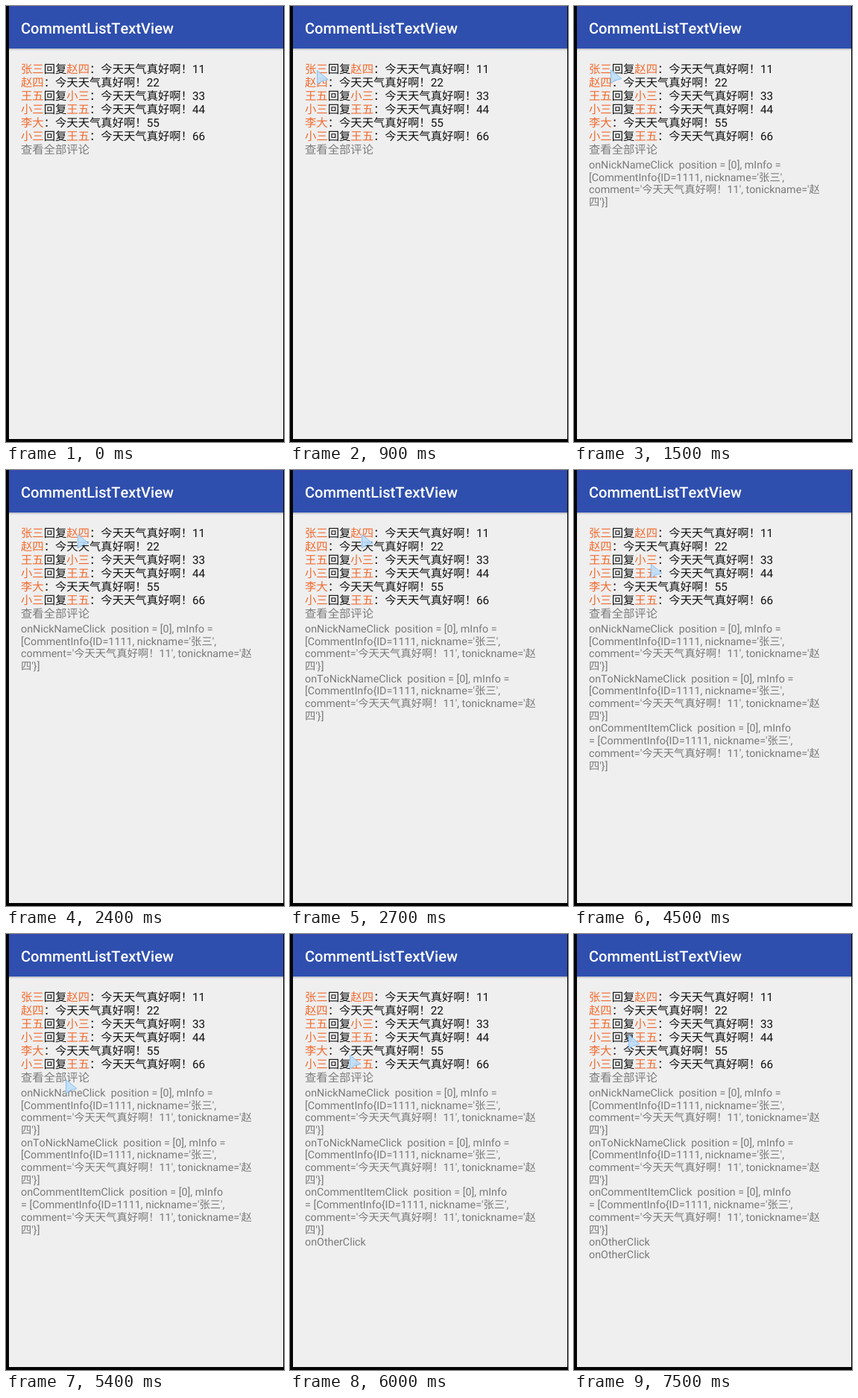
Animation, 373 px wide and 585 px high, one loop 8000 ms. Source, as an HTML page:

```html
<!DOCTYPE html>
<html lang="zh-CN">
<head>
<meta charset="utf-8">
<title>CommentListTextView</title>
<style>
  html, body { margin: 0; height: 100%; overflow: hidden; background: #040404; }
  svg { display: block; width: 373px; height: 585px; }
  text {
    font-family: Roboto, "Noto Sans CJK SC", "Noto Sans CJK", sans-serif;
    font-kerning: none;
    white-space: pre;
    text-rendering: geometricPrecision;
  }
  .title { font-size: 20.1px; font-weight: 500; fill: #fff; }
  .comment { font-size: 15.33px; fill: #111; }
  .name { fill: #f26a2e; }
  .more { fill: #7c7c7c; }
  .log { font-size: 14.3px; fill: #7a7a7a; }
</style>
</head>
<body>
<svg viewBox="0 0 373 585">
  <defs>
    <linearGradient id="shade" x2="0" y2="1">
      <stop stop-color="#b4b8c2"/>
      <stop offset="1" stop-color="#efefef"/>
    </linearGradient>
  </defs>
  <rect x="4" width="368" height="581" fill="#efefef"/>
  <rect x="4" width="368" height="57" fill="#2f4fae"/>
  <rect x="4" y="57" width="368" height="3" fill="url(#shade)"/>
  <rect x="8.5" y="1.5" width="361" height="47" fill="none" stroke="#4a3cb8" stroke-opacity=".5"/>
  <text class="title" x="20" y="37">CommentListTextView</text>
  <g id="comments"></g>
  <g id="logs"></g>
  <path id="cursor" d="M2.5 1.5V20L8 16L17 13.5Z" fill="#bcdefa" fill-opacity=".9" stroke="#8cc0f2" stroke-linejoin="round"/>
</svg>
<script>
const LOOP = 8000, BEAT = 300;
const $ = id => document.getElementById(id);

function add(parent, tag, attributes = {}) {
  const el = document.createElementNS("http://www.w3.org/2000/svg", tag);
  for (const key in attributes) el.setAttribute(key, attributes[key]);
  return parent.appendChild(el);
}

function addText(parent, className, y, content) {
  add(parent, "text", { class: className, x: 20, y }).innerHTML = content;
}

// Comment list: author, optional addressee
const name = s => `<tspan class="name">${s}</tspan>`;
const people = ["张三 赵四", "赵四", "王五 小三", "小三 王五", "李大", "小三 王五"];
people.forEach((pair, i) => addText($("comments"), "comment", 90 + 18 * i,
  `${pair.split(" ").map(name).join("回复")}：今天天气真好啊！${11 * (i + 1)}`));
addText($("comments"), "comment more", 198, "查看全部评论");

// Click log, each entry with the beat it appears on
const info = "[CommentInfo{ID=1111, nickname='张三',";
const rest = "\ncomment='今天天气真好啊！11', tonickname='赵\n四'}]";
const entries = [
  { beat: 4, text: `onNickNameClick  position = [0], mInfo =\n${info}${rest}` },
  { beat: 9, text: `onToNickNameClick  position = [0], mInfo =\n${info}${rest}` },
  { beat: 13, text: `onCommentItemClick  position = [0], mInfo\n= ${info}${rest}` },
  { beat: 19, text: "onOtherClick" },
  { beat: 24, text: "onOtherClick" }
];
let row = 0;
for (const entry of entries) {
  entry.group = add($("logs"), "g");
  for (const line of entry.text.split("\n"))
    addText(entry.group, "log", Math.floor(218.3 + 16.7 * row++), line);
}

// Where the pointer rests, from a given beat on
const stops = [
  { beat: 1, at: "259 192" },
  { beat: 2, at: "66 100" },
  { beat: 3, at: "34 85" },
  { beat: 5, at: "47 84" },
  { beat: 7, at: "94 85" },
  { beat: 10, at: "104 85" },
  { beat: 11, at: "145 81" },
  { beat: 15, at: "101 125" },
  { beat: 16, at: "78 194" },
  { beat: 20, at: "78 161" },
  { beat: 22, at: "71 134" }
];

const show = (el, visible) => el.style.display = visible ? "" : "none";

function draw() {
  const beat = performance.now() % LOOP / BEAT;
  for (const entry of entries) show(entry.group, beat >= entry.beat);
  const stop = stops.findLast(s => beat >= s.beat);
  show($("cursor"), stop);
  if (stop) $("cursor").setAttribute("transform", `translate(${stop.at})`);
  requestAnimationFrame(draw);
}
draw();
</script>
</body>
</html>
```
